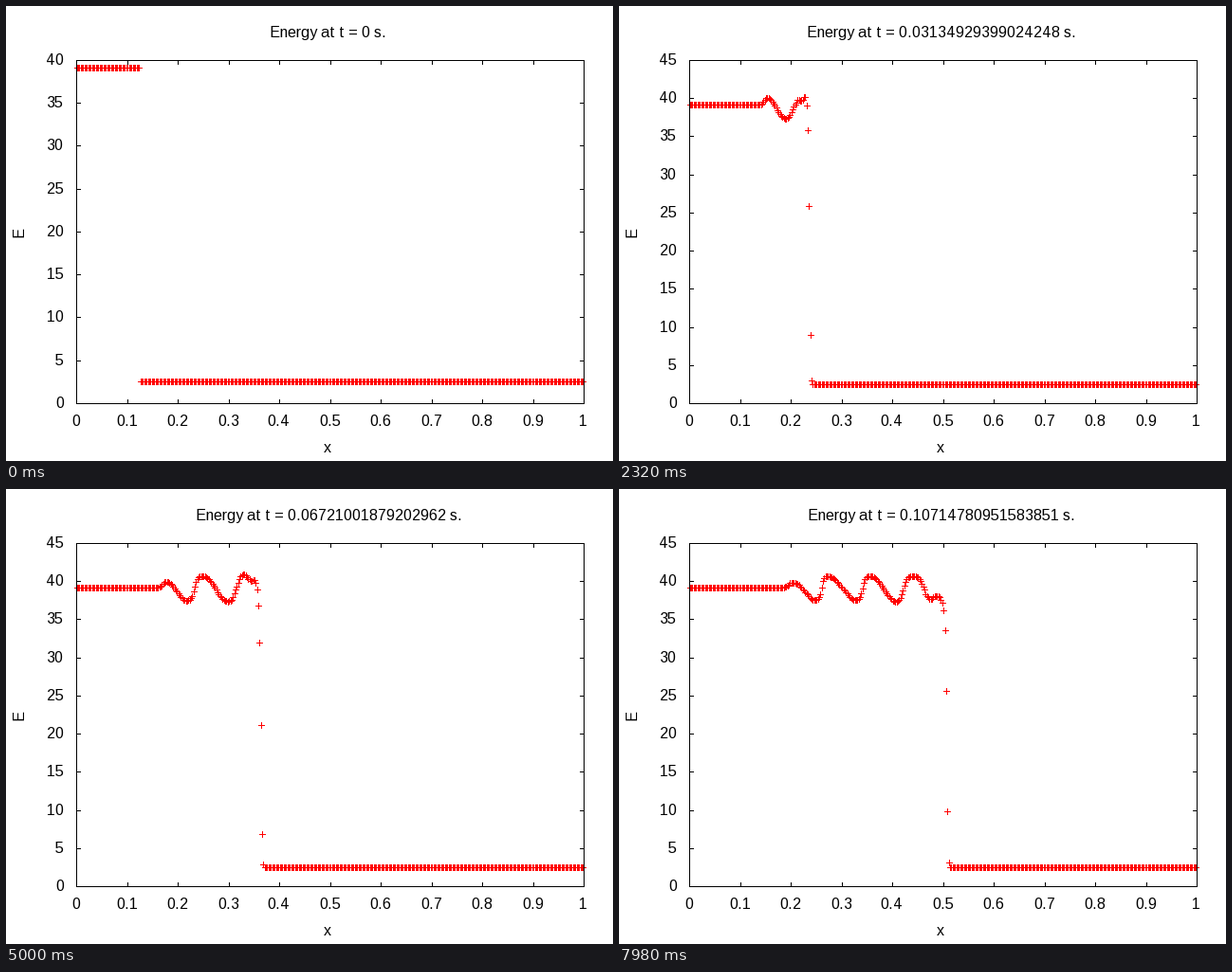
Animation of 640 by 480 pixels, one loop 8 s. Source, as a matplotlib script:

```python
import numpy as np
import matplotlib.pyplot as plt
from matplotlib.animation import FuncAnimation

plt.rcParams.update({"font.family": "Liberation Sans", "font.size": 11.52,
                     "text.hinting": "force_autohint", "text.hinting_factor": 1,
                     "path.simplify": False})

FRAMES, CELLS, CFL, GAMMA = 400, 400, 0.5, 1.4
LEFT, RIGHT, TOP, BOTTOM = 74, 609, 57, 419
PX = 0.72  # one pixel in points at 100 dpi
dx = 1 / CELLS
x = (np.arange(CELLS) + 0.5) * dx


# Shock running into a density wave: 1D Euler equations, MUSCL scheme with HLL flux
def conserved(rho, u, p):
    return np.array([rho, rho * u, p / (GAMMA - 1) + 0.5 * rho * u * u])


def flux(q):
    """Physical flux, velocity and sound speed of each state."""
    rho, m, e = q
    u = m / rho
    p = (GAMMA - 1) * (e - 0.5 * m * u)
    return np.array([m, m * u + p, (e + p) * u]), u, np.sqrt(GAMMA * p / rho)


def minmod(a, b):
    return 0.5 * (np.sign(a) + np.sign(b)) * np.minimum(np.abs(a), np.abs(b))


def hll(ql, qr):
    (fl, ul, cl), (fr, ur, cr) = flux(ql), flux(qr)
    sl = np.minimum(0, np.minimum(ul - cl, ur - cr))
    sr = np.maximum(0, np.maximum(ul + cl, ur + cr))
    return (sr * fl - sl * fr + sl * sr * (qr - ql)) / (sr - sl)


def rate(q):
    g = np.pad(q, ((0, 0), (2, 2)), mode="edge")
    d = np.diff(g)
    half = 0.5 * minmod(d[:, :-1], d[:, 1:])
    mid = g[:, 1:-1]
    return -np.diff(hll((mid + half)[:, :-1], (mid - half)[:, 1:])) / dx


def simulate():
    behind = x < 0.125
    q = conserved(np.where(behind, 3.857143, 1 + 0.2 * np.sin(20 * np.pi * x)),
                  np.where(behind, 2.629369, 0.0),
                  np.where(behind, 10.33333, 1.0))
    t, out = 0.0, []
    for _ in range(FRAMES):
        out.append((t, q[2].copy()))
        _, u, c = flux(q)
        dt = CFL * dx / (np.abs(u) + c).max()
        q1 = q + dt * rate(q)
        q = 0.5 * (q + q1 + dt * rate(q1))
        t += dt
    return out


states = simulate()

fig = plt.figure(figsize=(6.4, 4.8), dpi=100, facecolor="white")
ax = fig.add_axes([0, 0, 1, 1])
ax.set(xlim=(0, 640), ylim=(480, 0))
ax.axis("off")


def strokes(color, z):
    return ax.plot([], [], color=color, lw=PX, antialiased=False, snap=False,
                   solid_capstyle="butt", zorder=z)[0]


def segments(x0, y0, x1, y1):
    """Separate straight strokes joined by gaps."""
    x0, y0, x1, y1 = np.broadcast_arrays(x0, y0, x1, y1)
    gap = np.full(x0.shape, np.nan)
    return (np.stack([x0, x1, gap], -1).ravel(), np.stack([y0, y1, gap], -1).ravel())


def join(*parts):
    return np.hstack([np.array(p) for p in parts])


def label(px, py, s, ha="center", **kw):
    return ax.text(px, py, s, ha=ha, va="baseline", **kw)


def to_y(v, top):
    return BOTTOM - np.floor(np.asarray(v) / top * (BOTTOM - TOP) + 0.5)


ticks = strokes("black", 2)
marks = strokes("red", 3)
border = strokes("black", 4)
border.set_data(*segments([LEFT, LEFT, LEFT + 0.5, RIGHT + 0.5],
                          [TOP + 0.5, BOTTOM + 0.5, TOP, TOP],
                          [RIGHT + 1, RIGHT + 1, LEFT + 0.5, RIGHT + 0.5],
                          [TOP + 0.5, BOTTOM + 0.5, BOTTOM + 1, BOTTOM + 1]))
title = label(340, 33, "")
label(338.5, 471, "x")
ax.text(13.5, 238, "E", ha="center", va="center", rotation=90)

xt = LEFT + np.floor(np.linspace(0, 1, 11) * (RIGHT - LEFT) + 0.5)
for k, tx in enumerate(xt):
    label(tx - 0.5, 443, f"{k / 10:g}")
levels = np.arange(0, 50, 5)
ylabels = [label(61, 0, str(v), ha="right") for v in levels]
px = LEFT + np.floor(x * (RIGHT - LEFT) + 0.5)


def draw(i):
    t, energy = states[i]
    top = 5 * int(np.ceil(energy.max() / 5))
    title.set_text(f"Energy at t = {float(t) if i else 0} s.")
    yt = to_y(levels, top)
    for text, v, y in zip(ylabels, levels, yt):
        text.set_y(y + 5)
        text.set_visible(bool(v <= top))
    yt = yt[levels <= top] + 0.5
    ticks.set_data(*join(
        segments(xt + 0.5, TOP, xt + 0.5, TOP + 5),
        segments(xt + 0.5, BOTTOM - 4, xt + 0.5, BOTTOM + 1),
        segments(LEFT, yt, LEFT + 5, yt),
        segments(RIGHT - 4, yt, RIGHT + 1, yt)))
    py = to_y(energy, top)
    marks.set_data(*join(segments(px - 3, py + 0.5, px + 4, py + 0.5),
                         segments(px + 0.5, py - 3, px + 0.5, py + 4)))
    return [title, ticks, marks, *ylabels]


anim = FuncAnimation(fig, draw, frames=FRAMES, interval=20, repeat=True,
                     repeat_delay=0, blit=False)
plt.show()
```
